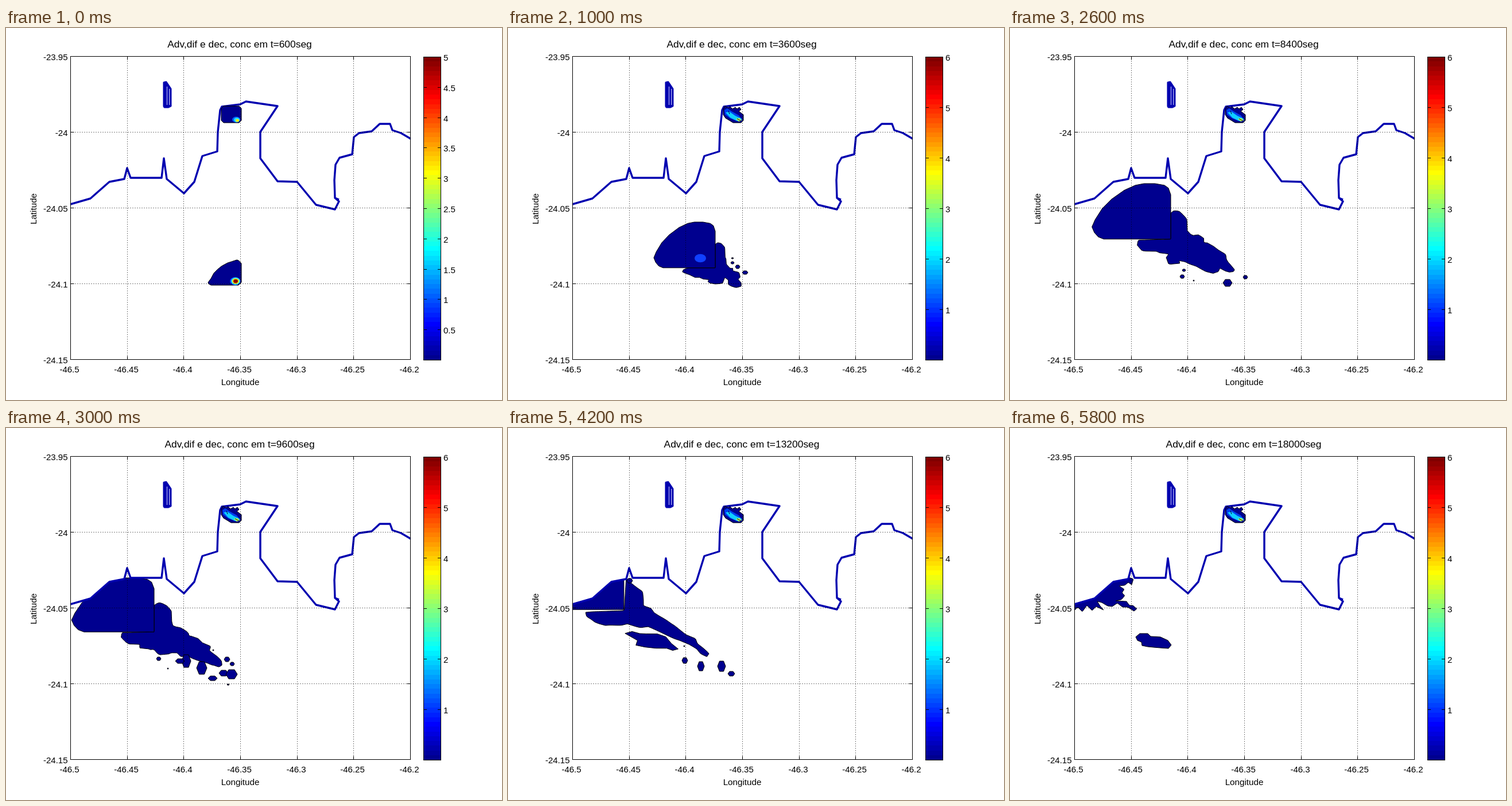
These frames come from a looping animation (864 by 648 pixels, 6000 ms). An HTML page with a canvas:

```html
<!DOCTYPE html>
<html>
<head>
<meta charset="utf-8">
<style>
html, body { margin: 0; width: 100%; height: 100%; overflow: hidden; background: #fff; }
canvas { display: block; }
</style>
</head>
<body>
<canvas id="stage" width="864" height="648"></canvas>
<script>
const ctx = document.getElementById('stage').getContext('2d');
const FONT = '"Liberation Sans", Arial, sans-serif';
const NAVY = '#00008f', COAST_BLUE = '#0000b0';
const STEP = 200, STEPS = 30;
const AXES = { l: 112.5, t: 49.5, r: 704.5, b: 577.5 };

const parse = s => s.trim().split(/\s+/).map(p => p.split(',').map(Number));
const mix = (a, b, k) => a + (b - a) * k;
const mixPts = (a, b, k) => a.map((p, i) => [mix(p[0], b[i][0], k), mix(p[1], b[i][1], k)]);

const coast = parse(`112,307 147,297 180,268 206,263 211,244 217,261 271,261 275,227 280,263
  310,288 328,268 342,223 368,215 369,181 373,143 376,137 408,133 418,128 473,136 443,181
  443,227 473,267 507,268 540,308 573,316 580,302 573,296 572,265 574,238 581,226 603,220
  606,190 615,183 637,180 651,167 669,167 673,178 688,183 705,193`);
const island = parse('275,95 279,94 287,106 287,136 283,138 276,138 275,136');

// Leading part of the plume, in units of its bounding box.
const head = parse(`1,1 1,.2 .97,.08 .92,.03 .8,0 .66,0 .55,.03 .41,.12 .25,.28 .13,.45
  .04,.65 0,.78 .03,.88 .08,.96 .15,1`);
const firstHead = parse(`1,.89 1,.14 .95,.06 .9,.01 .86,0 .72,.06 .58,.12 .4,.25 .28,.38 .17,.53
  .09,.73 0,.89 .02,.95 .09,1 .91,1`);
const headBoxes = [
  [0, 352, 404, 410, 448], [4, 268, 347, 371, 424], [8, 212, 311, 331, 399],
  [12, 157, 276, 291, 374], [16, 100, 256, 247, 349], [20, 55, 225, 209, 321], [29, -20, 175, 145, 278]
];

// Trailing part: outline at a few steps, clockwise from its upper left.
const trail4 = parse(`371,385 375,382 381,383 386,389 386,420 391,428 397,425 395,432 406,432
  407,440 400,443 405,449 403,455 392,455 380,449 383,441 378,436 377,447 372,448 357,448
  352,444 357,440 330,440 322,434 310,428 315,424 371,424`);
const trail8 = parse(`331,352 336,349 345,353 353,361 355,378 361,377 363,386 377,392 375,399
  384,397 389,403 400,420 417,435 412,443 400,444 388,434 375,430 362,437 350,440 346,435
  340,437 318,430 322,418 290,418 275,410 273,404 276,399 331,399`);
const trail12 = parse(`291,329 296,325 306,326 318,340 319,361 330,369 340,366 349,372 347,380
  354,380 375,394 385,401 390,415 401,431 396,434 385,432 368,421 367,431 358,437 345,434
  330,425 318,418 298,412 302,418 282,420 280,407 290,398 268,395 240,395 232,385 234,376 291,374`);
const trail16 = parse(`247,302 256,297 270,302 278,311 279,337 291,341 308,351 309,356 325,360
  332,368 347,373 343,380 357,388 369,397 374,407 369,413 357,410 345,400 320,392 312,388
  300,392 295,384 262,387 250,378 240,381 219,379 222,371 203,370 190,358 191,350 247,349`);
const trail20 = parse(`209,262 219,272 228,280 238,288 239,314 255,320 262,328 280,338 300,350
  325,367 343,375 346,385 357,393 367,403 362,409 350,402 344,394 330,385 305,375 285,365
  270,358 255,351 240,352 228,349 215,345 205,347 175,348 155,341 140,330 138,322 209,321`);
const trail29 = parse(`180,266 206,260 215,263 212,273 206,269 200,274 190,275 199,281 195,287
  200,292 194,299 184,301 203,302 208,309 214,309 221,315 216,319 205,312 196,312 187,305
  178,311 170,310 160,304 152,302 157,310 163,317 150,311 143,318 134,309 126,320 118,312
  112,318 112,306 147,296`);
const slick20 = parse(`202,357 215,354 228,358 240,358 260,358 275,363 285,375 299,385 290,388
  280,384 260,384 240,382 222,379 226,370`);
const slick29 = parse(`219,364 226,358 240,358 245,363 262,364 275,370 281,378 276,384 262,383
  250,382 240,381 230,379 229,373 222,370`);

// Loose specks around each outlined step: x, y, half width, half height.
const specks = {
  4: [[394, 403, 2, 1], [394, 411, 3, 2], [403, 418, 4, 3], [416, 428, 5, 3]],
  8: [[334, 441, 11, 4], [375, 443, 16, 8], [400, 452, 4, 1]],
  12: [[303, 435, 4, 3], [306, 424, 3, 2], [413, 436, 4, 3], [382, 446, 8, 6], [323, 442, 1, 1]],
  16: [[263, 400, 4, 3], [311, 404, 8, 11], [300, 404, 8, 4], [338, 416, 9, 11], [357, 434, 8, 4],
    [376, 425, 8, 5], [390, 427, 10, 8], [382, 401, 5, 4], [391, 409, 4, 3], [279, 417, 1, 1],
    [384, 445, 2, 1], [358, 385, 1, 1]],
  20: [[311, 407, 5, 5], [339, 417, 6, 8], [375, 417, 7, 9], [392, 430, 6, 4], [310, 382, 1, 1],
    [215, 268, 5, 4]]
};

function resample(pts, n) {
  const ring = [...pts, pts[0]], dist = [0];
  for (let i = 1; i < ring.length; i++)
    dist.push(dist[i - 1] + Math.hypot(ring[i][0] - ring[i - 1][0], ring[i][1] - ring[i - 1][1]));
  const out = [], total = dist[dist.length - 1];
  for (let k = 0, j = 1; k < n; k++) {
    const d = total * k / n;
    while (dist[j] < d) j++;
    const f = (d - dist[j - 1]) / (dist[j] - dist[j - 1]);
    out.push([mix(ring[j - 1][0], ring[j][0], f), mix(ring[j - 1][1], ring[j][1], f)]);
  }
  return out;
}
const trails = [trail4, trail8, trail12, trail16, trail20, trail29]
  .map((pts, i) => [i < 5 ? 4 * i + 4 : 29, resample(pts, 180)]);
trails.unshift([0, Array(180).fill([402, 441])]);

function between(keys, step) {
  const i = Math.max(1, keys.findIndex(k => k[0] >= step));
  const a = keys[i - 1], b = keys[i];
  return [a, b, (step - a[0]) / (b[0] - a[0])];
}

function trace(pts, close) {
  ctx.beginPath();
  pts.forEach(p => ctx.lineTo(...p));
  if (close) ctx.closePath();
}
function patch(pts, fill, edge = '#000') {
  trace(pts, true);
  ctx.fillStyle = fill;
  ctx.fill();
  if (!edge) return;
  ctx.strokeStyle = edge;
  ctx.lineWidth = 1;
  ctx.stroke();
}
function oval(x, y, rx, ry, fill) {
  if (rx <= 0 || ry <= 0) return;
  ctx.beginPath();
  ctx.ellipse(x, y, rx, ry, 0, 0, 7);
  ctx.fillStyle = fill;
  ctx.fill();
}
function line(x1, y1, x2, y2) {
  ctx.beginPath();
  ctx.moveTo(x1, y1);
  ctx.lineTo(x2, y2);
  ctx.stroke();
}
function text(s, x, y, align = 'center', size = 15) {
  ctx.font = size + 'px ' + FONT;
  ctx.textAlign = align;
  ctx.fillStyle = '#000';
  ctx.fillText(s, x, y);
}

function drawPlume(step) {
  ctx.save();
  trace([...coast, [704, 577], [112, 577]], true);
  ctx.clip();

  const [ta, tb, tk] = between(trails, step);
  if (step) patch(mixPts(ta[1], tb[1], tk), NAVY);
  if (step > 17) patch(mixPts(slick20, slick29, Math.max(0, step - 20) / 9), NAVY);

  const near = Math.floor((step + 2) / 4) * 4, d = step - near;
  for (const [x, y, w, h] of specks[near] || []) {
    const cx = x - 3 * d, cy = y - 2 * d;
    patch([[cx - w, cy], [cx - w / 2, cy - h], [cx + w / 2, cy - h],
      [cx + w, cy], [cx + w / 2, cy + h], [cx - w / 2, cy + h]], NAVY);
  }

  if (step < 26) {
    const [a, b, k] = between(headBoxes, step);
    const [, l, t, r, bottom] = a.map((v, i) => mix(v, b[i], k));
    const shape = mixPts(firstHead, head, Math.min(1, step / 2));
    patch(shape.map(([u, v]) => [mix(l, r, u), mix(t, bottom, v)]), NAVY);
  }

  // Concentrated core, fading as it drifts.
  const x = step < 4 ? 399 - 13.25 * step : 346 - 11 * (step - 4);
  const y = step < 4 ? 441 - 8.25 * step : 408 - 7 * (step - 4);
  const shrink = Math.max(0, step - 4);
  if (step < 11) oval(x, y, (step ? 11 : 9) - shrink, (step ? 8 : 7) - .75 * shrink, '#1040ff');
  [['#20dfff', 8, 3], ['#ffef00', 6, 2], ['#8f0000', 4, 1]].forEach(([c, size, life]) =>
    oval(x + 1, y, size * (1 - step / life), size * .8 * (1 - step / life), c));
  ctx.restore();
}

function drawBaySource(step) {
  if (step < 2) {
    patch(parse('379,136 406,136 410,140 410,161 406,165 379,165 375,161 375,140'), NAVY);
    oval(401, 159.5, 7, 5, '#0060ff');
    oval(402, 160, 5, 4, '#20dfff');
    oval(403, 161, 3, 2.5, '#ffef00');
    return;
  }
  patch(parse(`378,136 383,139 387,137 391,141 396,138 399,141 403,138 406,142 402,145 410,151
    410,161 406,165 392,165 384,160 379,157 375,151 375,141`), NAVY);
  patch(parse('377,143 382,140 391,146 402,152 408,160 402,163 388,158 378,151'), '#0040f0', null);
  patch(parse('379,147 386,146 396,153 407,158 406,162 399,162 387,156'), '#10cfff', null);
  patch(parse('397,158 403,157 407,161 402,163'), '#bfff40', null);
  ctx.strokeStyle = '#000040';
  ctx.lineWidth = 1;
  line(384, 144, 386, 150);
  line(399, 158, 406, 162);
}

function drawCoast() {
  ctx.lineJoin = 'round';
  ctx.strokeStyle = COAST_BLUE;
  ctx.lineWidth = 3.4;
  ctx.save();
  ctx.beginPath();
  ctx.rect(112, 49, 593, 529);
  ctx.clip();
  trace(coast);
  ctx.stroke();
  line(573, 296, 580, 299);
  ctx.restore();
  trace(island, true);
  ctx.fillStyle = COAST_BLUE;
  ctx.fill();
  ctx.lineWidth = 3;
  ctx.stroke();
  ctx.strokeStyle = '#d8d8ff';
  ctx.lineWidth = 1;
  line(280.5, 102, 280.5, 134);
  line(284.5, 106, 284.5, 134);
  ctx.lineJoin = 'miter';
}

function drawAxes() {
  const { l, t, r, b } = AXES;
  ctx.strokeStyle = '#000';
  ctx.lineWidth = 1;
  for (let i = 0; i <= 6; i++) {
    const x = Math.floor(l + (r - l) * i / 6) + .5;
    ctx.setLineDash([1, 3]);
    if (i % 6) line(x, t, x, b);
    ctx.setLineDash([]);
    line(x, b, x, b - 6);
    line(x, t, x, t + 6);
    text(String(+(-46.5 + i * .05).toFixed(2)), x - 2, 600);
  }
  for (let i = 0; i <= 4; i++) {
    const y = t + (b - t) * i / 4;
    ctx.setLineDash([1, 3]);
    if (i % 4) line(l, y, r, y);
    ctx.setLineDash([]);
    line(l, y, l + 6, y);
    line(r, y, r - 6, y);
    text(String(+(-23.95 - i * .05).toFixed(2)), 107.5, y + 6.5, 'right');
  }
  ctx.strokeRect(l, t, r - l, b - t);
  text('Longitude', 408, 622, 'center', 15.2);
  ctx.save();
  ctx.translate(53, 315);
  ctx.rotate(-Math.PI / 2);
  text('Latitude', 0, 0, 'center', 15.2);
  ctx.restore();
}

function drawScale(step) {
  const ramp = (x, c) => 255 * Math.max(0, Math.min(1, 1.5 - Math.abs(4 * x - c)));
  for (let i = 0; i < 64; i++) {
    const x = (i + 1) / 64;
    ctx.fillStyle = `rgb(${ramp(x, 3)},${ramp(x, 2)},${ramp(x, 1)})`;
    const top = Math.round(578 - 528 * x);
    ctx.fillRect(727, top, 31, Math.round(578 - 528 * i / 64) - top);
  }
  ctx.strokeStyle = '#000';
  ctx.lineWidth = 1;
  ctx.strokeRect(727.5, 50.5, 30, 528);
  const max = step ? 6 : 5, gap = step ? 1 : .5;
  for (let v = gap; v <= max; v += gap) {
    const y = Math.round(578 - 528 * v / max) + .5;
    line(727, y, 733, y);
    line(752, y, 758, y);
    text(String(v), 762, y + 6.5, 'left');
  }
}

function draw(step) {
  ctx.fillStyle = '#fff';
  ctx.fillRect(0, 0, 864, 648);
  drawPlume(step);
  drawCoast();
  drawBaySource(step);
  drawAxes();
  drawScale(step);
  text(`Adv,dif e dec, conc em t=${600 * (step + 1)}seg`, 407, 34, 'center', 17.4);
}

const start = performance.now();
let shown = -1;
function tick() {
  const step = Math.floor((performance.now() - start) / STEP) % STEPS;
  if (step !== shown) draw(shown = step);
  requestAnimationFrame(tick);
}
tick();
</script>
</body>
</html>
```
